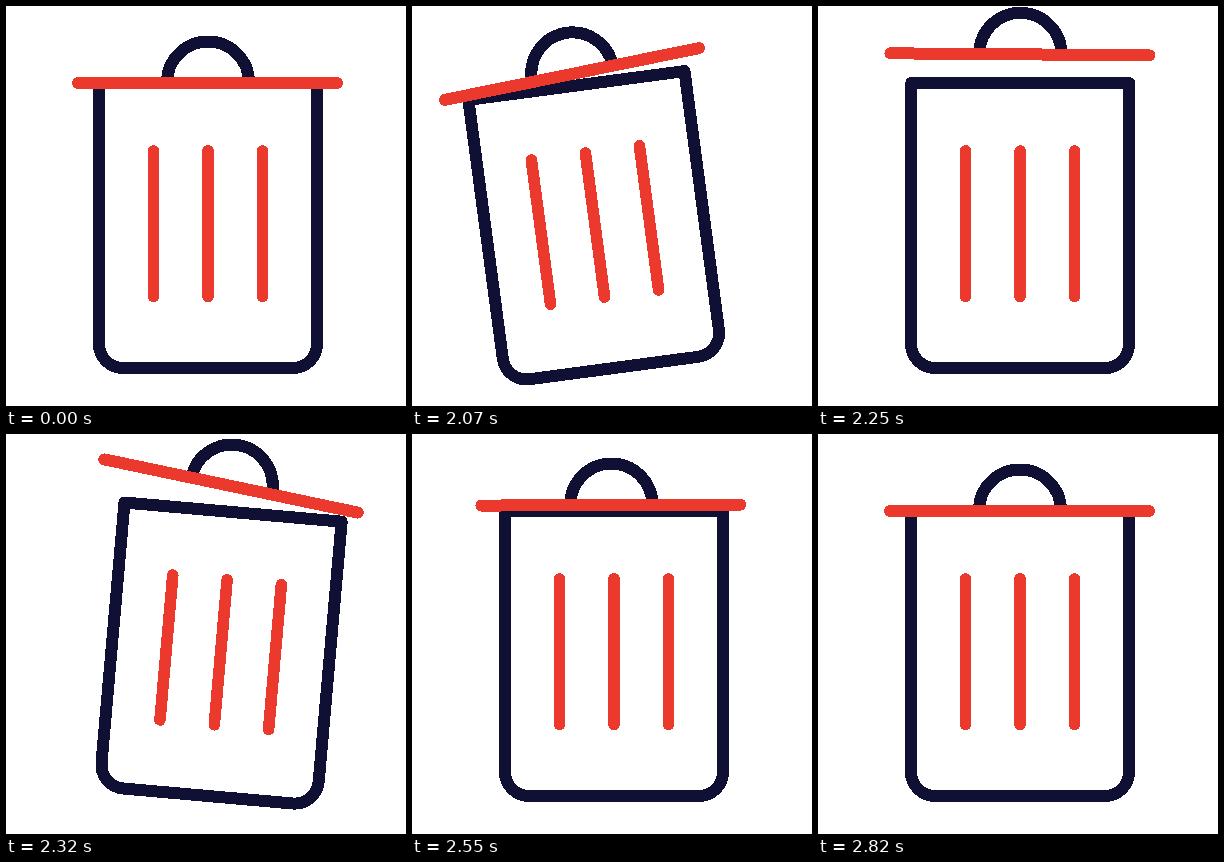
These frames come from a looping animation (400 by 400 pixels, 2850 ms). An HTML page:

```html
<!DOCTYPE html>
<html lang="en">
<head>
<meta charset="utf-8">
<title>Trash can</title>
<style>
  html, body { margin: 0; width: 100%; height: 100%; overflow: hidden; background: #fff; }
  svg { display: block; width: 100%; height: 100%; }
  .dark { stroke: #0f1033; }
  .red { stroke: #eb392e; }
</style>
</head>
<body>
<svg viewBox="0 0 400 400" fill="none" stroke-width="12" stroke-linecap="round" stroke-linejoin="round" shape-rendering="crispEdges">
  <g id="can">
    <path class="dark" d="M93 77H311V338A24 24 0 0 1 287 362H117A24 24 0 0 1 93 338Z"/>
    <path class="red" stroke-width="11.6" d="M147.5 145V290.5M202 145V290.5M256.5 145V290.5"/>
    <g id="lid">
      <path class="dark" stroke-linecap="butt" d="M161 76.5A41 41 0 0 1 243 76.5"/>
      <path class="red" d="M72 77H331"/>
    </g>
  </g>
</svg>
<script>
const LOOP = 2850;
const REST = 2000;
const can = document.getElementById('can');
const lid = document.getElementById('lid');

const smooth = u => (1 - Math.cos(Math.PI * u)) / 2;
const linear = u => u;
const out = u => 1 - (1 - u) ** 2.4;

// Turning points as [ms after the rest, value, easing towards it]; each motion starts at 0.
const swing = [[160, -9.7, out], [310, 5.2], [457, -0.8], [525, 0]];
const tilt = [[160, -8.7], [322, 6.8], [364, 6.8], [620, -1.7], [825, 0]];
const lift = [[180, 28.8, linear], [230, 28.8], [687, 0]];
const slide = [[150, -4.8, linear], [250, 0.1], [400, -7.6], [650, 0]];

function ease(points, t) {
  let t0 = 0, v0 = 0;
  for (const [t1, v1, curve = smooth] of points) {
    if (t < t1) return v0 + (v1 - v0) * curve(Math.max(0, t - t0) / (t1 - t0));
    [t0, v0] = [t1, v1];
  }
  return v0;
}

function draw(now) {
  // Poses advance 40 times a second, on 10 ms boundaries.
  const ms = Math.floor((now % LOOP) / 10) * 10;
  const t = Math.floor((ms + 5) / 25) * 25 - REST;
  can.setAttribute('transform', `rotate(${ease(swing, t)} 202 362)`);
  lid.setAttribute('transform',
    `translate(${ease(slide, t)} ${-ease(lift, t)}) rotate(${ease(tilt, t)} 201.5 77)`);
}

const start = performance.now();
function tick() {
  draw(performance.now() - start);
  requestAnimationFrame(tick);
}
tick();
</script>
</body>
</html>
```
